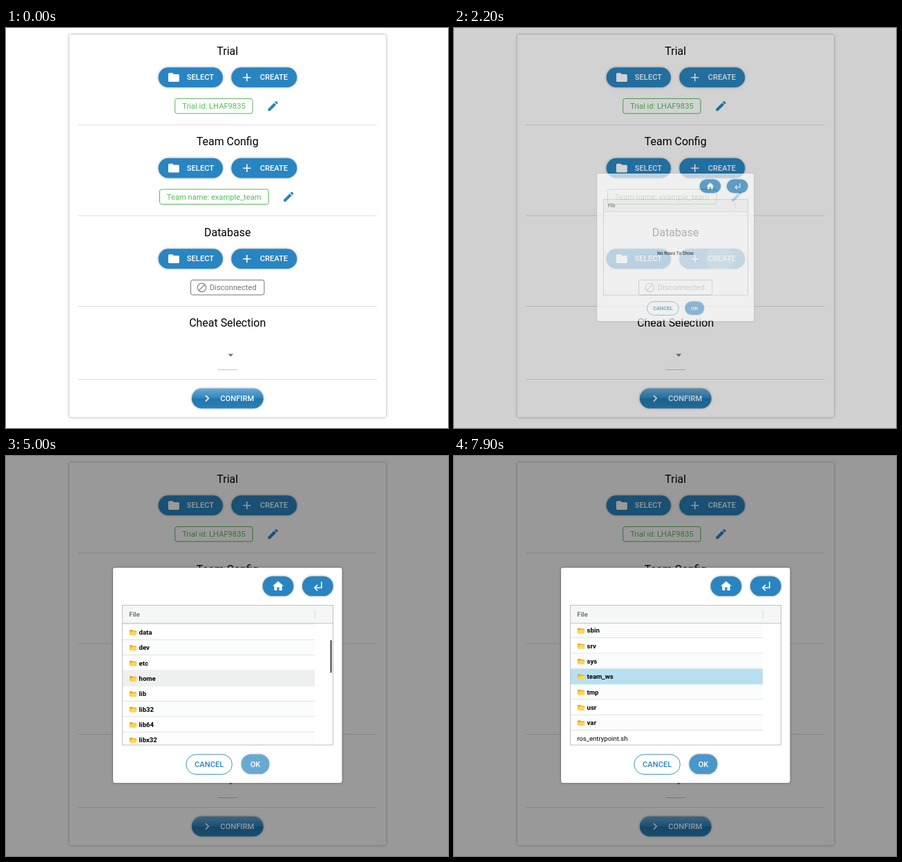
Write an HTML page that moves like this. It is 640x580 px and loops after 8000 ms.

```html
<!DOCTYPE html>
<html lang="en">
<head>
<meta charset="utf-8">
<title>Trial setup</title>
<style>
  html, body { margin: 0; width: 100%; height: 100%; overflow: hidden; background: #fefefe; }
  svg { display: block; width: 640px; height: 580px; font-family: Roboto, sans-serif; }
  .title { font-size: 15.94px; text-anchor: middle; }
  .label { font-size: 11.16px; font-weight: 500; fill: #fff; }
  .chip { font-size: 11.16px; }
  .grid { font-size: 9.56px; }
  .bold { font-weight: 700; }
  .raised { filter: drop-shadow(0 .9px 1px rgba(0,0,0,.24)) drop-shadow(0 .8px 2px rgba(0,0,0,.2)); }
</style>
</head>
<body>
<svg id="stage" viewBox="0 0 640 580" xmlns="http://www.w3.org/2000/svg"></svg>
<script>
const LOOP = 8000;
const BLUE = '#2985c1';
const UNIT = 0.797;            // interface zoom
const BTN_H = 36 * UNIT;
const SECTION = 131.5;
const ROW = 28 * UNIT;
const LIST_TOP = 243, LIST_H = 175.5;
const POINTER_Y = 326;
const SCROLL_END = 469.7;

const ICONS = {
  folder: 'M10 4H4c-1.1 0-2 .9-2 2v12c0 1.1.9 2 2 2h16c1.1 0 2-.9 2-2V8c0-1.1-.9-2-2-2h-8z',
  add: 'M19 13h-6v6h-2v-6H5v-2h6V5h2v6h6z',
  edit: 'M3 17.25V21h3.75L17.81 9.94l-3.75-3.75zM20.71 7.04a1 1 0 0 0 0-1.41l-2.34-2.34a1 1 0 0 0-1.41 0l-1.83 1.83 3.75 3.75z',
  block: 'M12 2a10 10 0 1 0 0 20a10 10 0 1 0 0-20zM4 12a8 8 0 0 1 12.9-6.31L5.69 16.9A7.9 7.9 0 0 1 4 12zm8 8a7.9 7.9 0 0 1-4.9-1.69L18.31 7.1A8 8 0 0 1 12 20z',
  down: 'M7 10l5 5 5-5z',
  next: 'M10 6L8.59 7.41 13.17 12l-4.58 4.59L10 18l6-6z',
  home: 'M10 20v-6h4v6h5v-8h3L12 3 2 12h3v8z',
  up: 'M11 9l1.42 1.42L8.83 14H18V4h2v12H8.83l3.59 3.58L11 21l-6-6 6-6z'
};

const folders = ('bin boot build config data dev etc home lib lib32 lib64 libx32 logs media ' +
  'mnt models opt proc results root run sbin srv sys team_ws tmp usr var').split(' ');
// the last folder before "run" is row 19
const TEAM_ROW = folders.indexOf('team_ws');
const ROWS = folders.length + 1;

const icon = (name, cx, cy, fill = '#fff', size = 24 * UNIT) =>
  `<path d="${ICONS[name]}" fill="${fill}" transform="translate(${cx - size / 2} ${cy - size / 2}) scale(${size / 24})"/>`;

const text = (x, y, str, cls, extra = '') => `<text x="${x}" y="${y}" class="${cls}" ${extra}>${str}</text>`;

const pill = (x, y, w, fill, extra = '') =>
  `<rect x="${x}" y="${y}" width="${w}" height="${BTN_H}" rx="${BTN_H / 2}" fill="${fill}" ${extra}/>`;

const button = (x, y, w, inner, id) => pill(x, y, w, BLUE, 'class="raised"') +
  (id ? pill(x, y, w, '#fff', `id="${id}Hover" opacity="0"`) +
    `<clipPath id="${id}Clip">${pill(x, y, w, '#fff')}</clipPath>
     <g clip-path="url(#${id}Clip)"><circle id="${id}Ripple" fill="#fff" opacity="0"/></g>` : '') + inner;

const line = (x1, y1, x2, y2, color) =>
  `<path d="M${x1} ${y1}L${x2} ${y2}" stroke="${color}" stroke-width="1"/>`;

const chip = (x, y, w, color) =>
  `<rect x="${x}" y="${y}" width="${w}" height="21.6" rx="3" fill="none" stroke="${color}"/>`;

function section(i, title, createId) {
  const y = i * SECTION;
  return text(320.7, 38.8 + y, title, 'title') +
    button(220.7, 57.3 + y, 93.2, icon('folder', 242.9, 71.7 + y) + text(261.8, 75.3 + y, 'SELECT', 'label')) +
    button(326.4, 57.3 + y, 94.8, icon('add', 348.8, 71.7 + y) + text(367.7, 75.3 + y, 'CREATE', 'label'), createId) +
    line(104, 140.5 + y, 537, 140.5 + y, '#dedede');
}

function form() {
  const green = '#4cc450', rim = '#58b65a', gray = '#757575';
  return `<rect x="91.6" y="9.6" width="458.8" height="554.8" rx="3.2" fill="#fff" class="raised"/>` +
    section(0, 'Trial') + section(1, 'Team Config') + section(2, 'Database', 'create') +
    chip(244.7, 102.4, 112.4, rim) +
    text(301, 117.1, 'Trial id: LHAF9835', 'chip', `fill="${green}" text-anchor="middle"`) +
    icon('edit', 386.5, 113.2, BLUE) +
    chip(222.5, 233.9, 157.6, rim) +
    text(301.2, 248.6, 'Team name: example_team', 'chip', `fill="${green}" text-anchor="middle"`) +
    icon('edit', 409.2, 244.7, BLUE) +
    chip(267.5, 365.4, 106.4, gray) + icon('block', 283.5, 376.3, '#8a8a8a', 16.4) +
    text(294.8, 380.1, 'Disconnected', 'chip', `fill="${gray}"`) +
    text(320.7, 433.3, 'Cheat Selection', 'title') +
    icon('down', 325.4, 474.1, gray) + line(306.5, 495.5, 335, 495.5, '#c4c4c4') +
    line(104, 509.5, 537, 509.5, '#dedede') +
    button(269, 522.7, 103.6, pill(269, 522.7, 103.6, 'url(#gloss)') +
      icon('next', 291.2, 537.1) + text(310.3, 540.5, 'CONFIRM', 'label'));
}

function rowMarkup(i) {
  const y = i * ROW, base = y + ROW / 2 + 3.4, isDir = i < folders.length;
  const folderIcon = `<g transform="translate(179 ${y + ROW / 2 - 3.9})">
    <path d="M0 1.2Q0 .2 1 .2H3.6L4.8 1.4H9Q10 1.4 10 2.4V7H0z" fill="#dfa52c"/>
    <path d="M1 2.6H10.6L9.8 8.2H.4z" fill="#ffd65a"/></g>`;
  return (isDir ? folderIcon + text(192.6, base, folders[i], 'grid bold') : text(178.2, base, 'ros_entrypoint.sh', 'grid'));
}

function rowBack(i) {
  return `<rect x="169" y="${i * ROW}" width="278" height="${ROW}" fill="${i % 2 ? '#fbfcfc' : '#fff'}"/>` +
    line(169, (i + 1) * ROW - .5, 447, (i + 1) * ROW - .5, '#d9dcde');
}

function dialog() {
  const all = [...Array(ROWS).keys()];
  return `<rect x="155" y="162" width="331.5" height="312" rx="3.2" fill="#fff" class="raised"/>` +
    button(371.7, 174.4, 44.6, icon('home', 394, 188.6)) +
    button(429, 174.4, 44.6, icon('up', 451.3, 188.6), 'up') +
    `<rect x="169" y="217" width="304" height="25.5" fill="#f5f6f6"/>` +
    line(168.5, 242.5, 473, 242.5, '#c3c7ca') + line(447, 223, 447, 236, '#d3d6d8') +
    text(178.2, 232.9, 'File', 'grid bold', 'fill="#737576"') +
    text(320.6, 333.6, 'No Rows To Show', 'grid', 'id="empty" text-anchor="middle"') +
    `<clipPath id="listClip"><rect x="169" y="${LIST_TOP}" width="304" height="${LIST_H}"/></clipPath>
     <g id="list" clip-path="url(#listClip)"><g id="rows">${all.map(rowBack).join('')}
       <rect id="mark" x="169" width="278" height="${ROW}"/>${all.map(rowMarkup).join('')}</g>
       <rect id="thumb" x="469.4" width="2.4" height="${LIST_H * LIST_H / (ROWS * ROW)}" rx="1.2" fill="#5a5a5a"/></g>
     <rect x="168.5" y="216.5" width="305" height="202.5" fill="none" stroke="#bdc0c2"/>` +
    pill(260.8, 432.8, 66.6, '#fff', `stroke="${BLUE}" stroke-width=".9"`) +
    text(294.2, 450.5, 'CANCEL', 'label', `text-anchor="middle" style="fill:${BLUE}"`) +
    `<g id="ok">${button(340.7, 432.4, 40.6, text(361, 450.5, 'OK', 'label', 'text-anchor="middle"'), 'ok')}</g>`;
}

document.getElementById('stage').innerHTML = `
  <defs><linearGradient id="gloss" x2="0" y2="1">
    <stop stop-color="#fff" stop-opacity=".3"/><stop offset=".5" stop-color="#fff" stop-opacity="0"/>
    <stop offset=".51" stop-opacity=".12"/><stop offset="1" stop-opacity=".04"/>
  </linearGradient></defs>
  <rect width="640" height="580" fill="#fefefe"/>${form()}
  <rect id="shade" width="640" height="580"/><g id="dialog">${dialog()}</g>`;

const $ = id => document.getElementById(id);
const set = (id, attrs) => { for (const k in attrs) $(id).setAttribute(k, attrs[k]); };
const span = (t, a, b) => Math.min(1, Math.max(0, (t - a) / (b - a)));
const easeOut = (p, power) => 1 - Math.pow(1 - p, power);
const show = (id, on) => set(id, { visibility: on ? 'inherit' : 'hidden' });

function hover(id, t, on, off) {
  const level = easeOut(span(t, on, on + 400), 2) - easeOut(span(t, off, off + 400), 2);
  set(id + 'Hover', { opacity: 0.15 * level });
}

function ripple(id, t, start, cx, cy, full) {
  const p = span(t, start, start + 400);
  const on = p > 0 && p < 1;
  set(id + 'Ripple', { cx, cy, r: full * (0.2 + 0.8 * p), opacity: on ? 0.2 * Math.min(1, 2 - 2 * p) : 0 });
}

function render(t) {
  hover('create', t, 400, 2300);
  ripple('create', t, 2100, 385, 335, 50);
  hover('up', t, 3100, 4450);
  ripple('up', t, 4000, 453, 190, 27);
  hover('ok', t, 7300, LOOP);

  const opening = span(t, 2105, 2405);
  const scale = easeOut(opening, 3);
  set('shade', { opacity: 0.4 * easeOut(opening, 1.5) });
  show('dialog', opening > 0);
  set('dialog', {
    opacity: scale,
    transform: `translate(320.7 318) scale(${Math.max(scale, 0.001)}) translate(-320.7 -318)`
  });

  const listed = t >= 4200;
  show('empty', !listed);
  show('list', listed);
  const scroll = SCROLL_END * span(t, 4850, 5659);
  set('rows', { transform: `translate(0 ${LIST_TOP - scroll})` });
  show('thumb', listed && t >= 4900 && t < 6200);
  set('thumb', { y: LIST_TOP + scroll / (ROWS * ROW) * LIST_H });

  const picked = t >= 6600;
  const row = picked ? TEAM_ROW : Math.floor((POINTER_Y - LIST_TOP + scroll) / ROW);
  set('mark', { y: row * ROW, fill: picked ? '#b8e0f2' : '#eeefef' });
  show('mark', listed && t >= 4700);
  set('ok', { opacity: t >= 6800 ? 1 : 0.7 });
}

function tick() {
  render(performance.now() % LOOP);
  requestAnimationFrame(tick);
}
tick();
</script>
</body>
</html>
```
